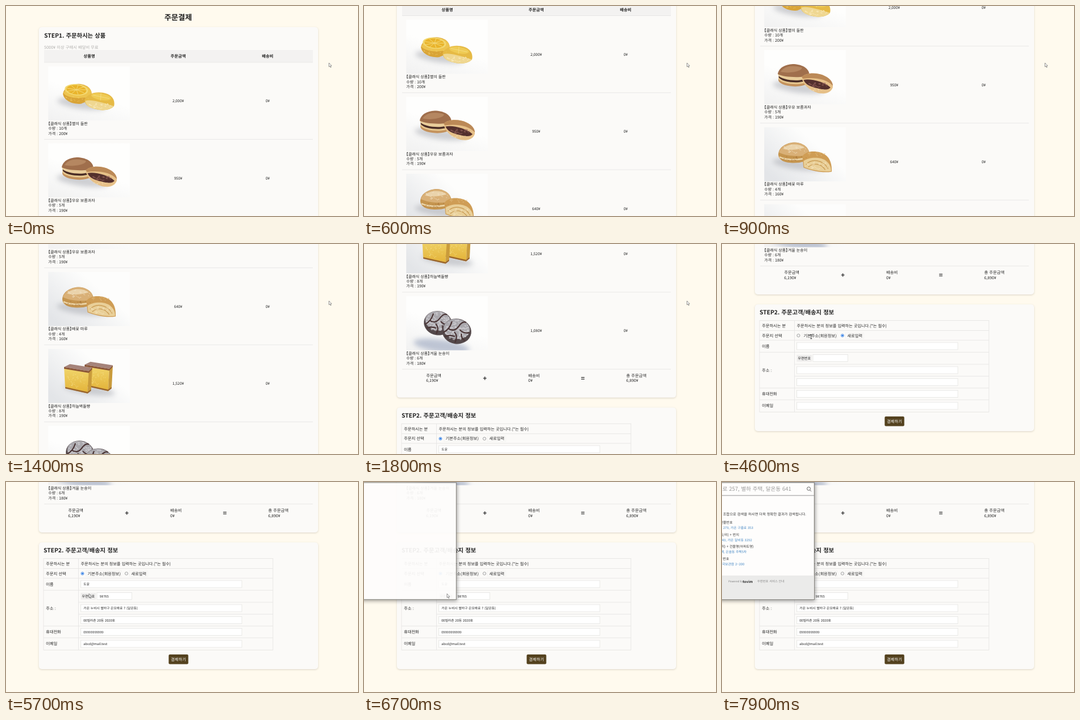
Animation, 600 px wide and 358 px high, one loop 8 s. Source, as an HTML page:

```html
<!DOCTYPE html>
<html>
<head>
<meta charset="utf-8">
<title>주문결제</title>
<style>
  html, body { margin: 0; width: 100%; height: 100%; overflow: hidden; background: #fffaee; }
  svg { display: block; width: 100%; height: 100%; }
  text {
    font-family: 'Noto Sans CJK KR', 'Noto Sans', sans-serif; fill: #222; white-space: pre;
    text-rendering: geometricPrecision; font-feature-settings: 'halt'; word-spacing: .08em;
  }
  .card { fill: #fbfaf8; filter: drop-shadow(0 1px 1.5px rgba(90, 80, 60, .22)); }
  .line { stroke: #e5e4e2; stroke-width: .8; fill: none; }
  .input { fill: #fff; stroke: #e2e1df; stroke-width: .7; }
</style>
</head>
<body>
<svg id="stage" viewBox="0 0 600 358" preserveAspectRatio="none"></svg>
<script>
const LOOP = 8000, STEP = 100, ROW = 131.3, FORM_Y = 715;

// ---- small builders ----
const text = (x, y, s, size = 7, attrs = '') => `<text x="${x}" y="${y}" font-size="${size}" ${attrs}>${s}</text>`;
const mid = (x, y, s, size, attrs = '') => text(x, y, s, size, `text-anchor="middle" ${attrs}`);
const rect = (x, y, w, h, attrs) => `<rect x="${x}" y="${y}" width="${w}" height="${h}" ${attrs}/>`;
const path = (d, fill, attrs = '') => `<path d="${d}" fill="${fill}" ${attrs}/>`;
const stroke = (d, color, width) => path(d, 'none', `stroke="${color}" stroke-width="${width}"`);
const oval = (x, y, rx, ry, fill, turn = 0, attrs = '') =>
  `<ellipse cx="${x}" cy="${y}" rx="${rx}" ry="${ry}" fill="${fill}" transform="rotate(${turn} ${x} ${y})" ${attrs}/>`;
const hline = (x1, x2, y) => `<path class="line" d="M${x1} ${y}H${x2}"/>`;

function specks(cx, cy, rx, ry, count, color, size, seed = 7) {
  let out = '';
  const rnd = () => (seed = seed * 16807 % 2147483647) / 2147483647;
  for (let i = 0; i < count; i++) {
    const a = rnd() * 6.283, r = Math.sqrt(rnd());
    out += oval((cx + Math.cos(a) * r * rx).toFixed(1), (cy + Math.sin(a) * r * ry).toFixed(1), size * (.5 + rnd()), size * .6, color);
  }
  return `<g opacity=".65">${out}</g>`;
}

// ---- pastries, drawn in a 139 x 92.5 box ----
const shadow = (x, y, rx, ry, color = '#a9abb2') => oval(x, y, rx, ry, color, 8, 'filter="url(#soft)" opacity=".55"');

function citrus() {
  let spokes = '';
  for (let i = 0; i < 9; i++) {
    const a = i * .698;
    spokes += `M48 40L${48 + 17 * Math.cos(a)} ${40 + 8 * Math.sin(a)}`;
  }
  return shadow(57, 64, 42, 9)
    + path('M25 47C27 36 38 30 52 30C66 31 75 38 74 49C72 58 63 61 56 64C42 65 27 59 25 47Z', '#d9a437')
    + path('M26 46C30 33 45 28 60 32C73 36 76 45 72 50C62 56 34 56 26 46Z', '#edc44f')
    + oval(48, 40, 20, 9.5, '#f3d871', 6) + oval(48, 40, 17, 8, '#e9b42b', 6)
    + stroke(spokes, '#f5dc80', .9)
    + path('M62 57C67 47 79 43 93 45C107 47 115 56 112 68C106 75 92 76 81 73C72 71 62 67 62 57Z', '#e6ba45')
    + path('M63 59C72 56 86 60 112 68C105 75 90 76 81 73C72 71 64 68 63 59Z', '#efd791')
    + oval(90, 52, 17, 5.5, '#efcb55', 10) + stroke('M76 49L104 55M90 46L89 58', '#f5dc80', 1)
    + specks(87, 67, 20, 5, 34, '#fff3cf', 1) + specks(48, 55, 21, 5, 22, '#f0cd6c', 1);
}

function pancake() {
  return shadow(58, 64, 44, 9)
    + oval(50, 52, 26, 10, '#c4925c', 3) + oval(50, 49, 26, 9, '#e6c78f', 3)
    + oval(50, 46.5, 25.5, 8.5, '#4a2d26', 3) + oval(50, 43, 26.5, 8.5, '#e9cd9a', 3)
    + path('M23 41C25 29 38 24 51 24C66 25 77 32 77 43C66 48 34 47 23 41Z', '#a06f4c')
    + path('M28 37C34 27 50 25 64 30C66 36 40 41 28 37Z', '#b58761')
    + path('M64 46C69 40 82 38 94 41C107 44 117 52 117 63C115 71 107 75 97 74C83 73 65 61 64 46Z', '#e6c088')
    + path('M64 46C69 40 82 38 94 41C107 44 117 52 117 61C107 49 84 46 66 49Z', '#bb8957')
    + path('M67 51C78 48 103 54 113 64C109 69 100 68 90 65C80 63 70 59 67 51Z', '#54302d')
    + specks(91, 59, 17, 4.5, 36, '#99665f', 1.3) + specks(90, 68, 14, 2, 18, '#f5e0b7', 1);
}

function pastry() {
  return shadow(58, 64, 44, 9)
    + path('M24 46C25 33 39 26 53 26C67 27 78 36 77 48C75 58 64 61 50 61C36 61 24 57 24 46Z', '#c5954f')
    + path('M25 43C29 30 45 25 58 27C72 30 78 39 75 47C64 51 37 50 25 43Z', '#d9b077')
    + path('M32 37C39 28 58 27 69 35C60 38 44 40 32 37Z', '#ead3ab')
    + stroke('M26 51C38 57 62 57 75 51', '#ecd7ab', 2.5)
    + path('M65 50C70 41 84 40 95 43C107 46 116 56 115 76C100 79 80 74 67 69Z', '#cf9d55')
    + path('M67 58C76 51 96 50 106 58C112 63 114 69 114 75C100 77 80 73 68 68Z', '#e9cf98')
    + stroke('M71 64C80 54 99 54 109 71M75 68C84 61 96 61 104 73', '#cca05a', 1.4)
    + specks(90, 65, 20, 7, 34, '#f6e6c2', 1.2) + specks(51, 37, 20, 8, 30, '#f3e3c8', 1.1)
    + specks(50, 53, 23, 5, 22, '#a8733a', 1.1, 31) + specks(88, 46, 16, 3, 18, '#e9c78e', 1, 13);
}

function sponge() {
  const block = (x, y) => `<g transform="translate(${x} ${y})">`
    + path('M0 6L42 13L40 50L2 41Z', 'url(#crumb)') + path('M42 13L48 7L46 45L40 50Z', '#c99b3b')
    + path('M0 5L10 0L48 6L42 12Z', '#a5837a') + path('M0 5L42 12L48 6V8.5L42 15L0 8Z', '#8a5538')
    + path('M2 39L40 47.5L46 43V45.5L40 50L2 41.5Z', '#99652f')
    + specks(20, 27, 16, 13, 40, '#f7e28e', .9) + '</g>';
  return shadow(70, 70, 44, 8) + block(62, 22) + block(27, 26);
}

function crinkle() {
  const ball = (x, y, r, seed) => `<g transform="translate(${x} ${y}) scale(${r / 25})">`
    + oval(0, 0, 25, 21.5, '#54494b', 8) + oval(0, -4, 22.5, 17, '#aaa8ad', 8)
    + specks(0, -2, 21, 17, 110, '#dddce0', 1.6, seed)
    + stroke('M-23 2Q-12-3-8-17M-15-5Q-4 2 3-8T16-15M-4 1Q3 9-3 19M5-3Q12 5 22 2M-20 9Q-12 5-3 9M8 4Q7 12 14 16', '#4a3536', 2.2)
    + '</g>';
  return shadow(60, 85, 48, 11, '#8f9cb8') + ball(54, 46, 24, 11) + ball(86, 60, 25, 29);
}

// ---- page ----
const products = [
  { name: '별의 들판', count: 10, price: 200, draw: citrus },
  { name: '우유 보름과자', count: 5, price: 190, draw: pancake },
  { name: '배꽃 마루', count: 4, price: 160, draw: pastry },
  { name: '하늘벽돌빵', count: 8, price: 190, draw: sponge },
  { name: '겨울 눈송이', count: 6, price: 180, draw: crinkle }
];

function productRow({ name, count, price, draw }, i) {
  const y = 96 + ROW * i;
  return `<svg x="72" y="${y + 6.8}" width="139" height="92.5">${rect(0, 0, 139, 92.5, `fill="url(#${i % 4 < 2 ? 'bright' : 'cool'})"`)}<g filter="url(#photo)">${draw()}</g></svg>`
    + text(72, y + 106.8, `【클래식 상품】${name}`, 6.8)
    + text(72, y + 115, `수량 : ${count}개`, 6.7) + text(72, y + 123.5, `가격 : ${price}¥`, 6.7)
    + mid(293.5, y + 68.4, (count * price).toLocaleString('en-US') + '¥', 6.4) + mid(446, y + 68.4, '0¥', 6.4)
    + hline(65, 523, y + ROW);
}

const orderCard = rect(56, 36, 476, 765, 'rx="5" class="card"')
  + mid(293.5, 23.5, '주문결제', 12.8, 'font-weight="700"')
  + text(65, 54.3, 'STEP1. 주문하시는 상품', 10, 'font-weight="700"')
  + text(65, 73.2, '5000¥ 이상 구매시 배달비 무료', 7, 'style="fill:#b0afad"')
  + rect(65, 75, 458, 21, 'fill="#f3f2f1"') + hline(65, 523, 96)
  + [['상품명', 142], ['주문금액', 293.5], ['배송비', 446]].map(([s, x]) => mid(x, 88, s, 7, 'font-weight="700"')).join('')
  + products.map(productRow).join('');

const totals = [['주문금액', '6,190¥', 106], ['배송비', '0¥', 280], ['총 주문금액', '6,890¥', 447]]
  .map(([label, sum, x]) => text(x, 51, label) + text(x, 59.5, sum, 6.7)).join('')
  + mid(206, 57.3, '+', 11, 'font-weight="700"') + mid(373, 57.3, '=', 11, 'font-weight="700"');

const labels = [['주문하시는 분', 142], ['주문지 선택', 158.6], ['이름', 177], ['주소 :', 217.6], ['휴대전화', 258.2], ['이메일', 278.4]];
const fields = [
  [127.5, 168, 274.5, '도윤'],
  [155, 188.5, 59.5, '98765'],
  [127.5, 209, 274.5, '가온 누비시 별하구 은모래로 7 (달온동)'],
  [127.5, 229.4, 274.5, '00빌라촌 20동 2020호'],
  [127.5, 249.6, 274.5, '09999999999'],
  [127.5, 270, 274.5, 'abcd@mail.test']
];
const radio = (x, id) => `<circle id="${id}" cx="${x}" cy="156" r="2.5"/><circle id="${id}Dot" cx="${x}" cy="156" r="1.5" fill="#2374e1"/>`;

const form = rect(56, 103, 476, 216, 'rx="5" class="card"')
  + text(64, 120.3, 'STEP2. 주문고객/배송지 정보', 10, 'font-weight="700"')
  + rect(64, 130.5, 391, 156, 'class="line"') + '<path class="line" d="M123.5 130.5V286.5"/>'
  + [147.5, 164, 184.5, 245.5, 265.7].map(y => hline(64, 455, y)).join('')
  + hline(123.5, 455, 205) + hline(123.5, 455, 225.3)
  + labels.map(([s, y]) => text(68, y, s)).join('')
  + text(127.5, 142, '주문하시는 분의 정보를 입력하는 곳입니다.(*는 필수)', 6.9)
  + rect(136.5, 151, 60, 10, 'fill="none" stroke="#f0efed" stroke-width=".6"')
  + rect(210.5, 151, 31, 10, 'fill="none" stroke="#f0efed" stroke-width=".6"')
  + radio(130.3, 'saved') + radio(205.3, 'fresh')
  + text(139, 158.6, '기본주소(회원정보)') + text(213.5, 158.6, '새로입력')
  + fields.map(([x, y, w]) => rect(x, y, w, 12, 'class="input"')).join('')
  + rect(127.5, 189, 25.5, 11.5, 'fill="#efeeed"') + mid(140.2, 197, '우편번호', 6)
  + `<g id="values">${fields.map(([x, y, , s]) => text(x + 4.5, y + 8.1, s, 5.6)).join('')}</g>`
  + rect(277.3, 294, 33.4, 16.6, 'rx="2" fill="#54421f"') + mid(294, 305, '결제하기', 7, 'style="fill:#fff"');

// ---- postcode window; lines run in from beyond the left edge ----
const popupLine = (x, y, s, size, color) => text(x, y, s, size, `text-anchor="end" style="fill:${color}"`);
const hints = [
  [18, 71.2, '도로명 + 건물번호', 53, 79.8, '은빛로 279, 가온 구름로 353'],
  [29, 92.3, '지역명(동/리) + 번지', 51, 101, '달온동 43, 가온 달비동 3292'],
  [54, 112.3, '지역명(동/리) + 건물명(아파트명)', 42, 121, '별하 주택, 은솔동 주택5차'],
  [12, 133.2, '사서함명 + 번호', 38, 142, '누비우체국보관함 2~200']
];
const popup = rect(-10, 1, 167.3, 199.3, 'fill="#fefdfc" stroke="#77756f" stroke-width="1" style="filter:drop-shadow(1px 2px 3px rgba(0,0,0,.4))"')
  + '<g id="search">'
  + popupLine(118, 15.2, '은빛로 257, 별하 주택, 달온동 641', 9.2, '#9a9a9a')
  + stroke('M0 23H157', '#8b8b8b', .9)
  + stroke('M150 13.8L152.3 16', '#555', .9) + '<circle cx="147.8" cy="11.4" r="2.9" fill="none" stroke="#555" stroke-width=".9"/>'
  + popupLine(143.5, 56.7, '아래와 같은 조합으로 검색을 하시면 더욱 정확한 결과가 검색됩니다.', 6.1, '#333')
  + hints.map(([x, y, s, x2, y2, link]) => popupLine(x, y, s, 5.8, '#333') + popupLine(x2, y2, link, 5.6, '#4487c4')).join('')
  + rect(0, 160, 156.8, 39.8, 'fill="#ebebea"') + hline(0, 157, 160)
  + text(11, 171.2, 'Powered by', 4.5, 'style="fill:#777"') + text(35.5, 171.5, 'tovim', 5.9, 'font-weight="700"')
  + text(60, 171.4, '우편번호 서비스 안내', 5.2, 'style="fill:#888"')
  + '</g>';

document.getElementById('stage').innerHTML = `
  <defs>
    <filter id="soft" x="-50%" y="-100%" width="200%" height="300%"><feGaussianBlur stdDeviation="4"/></filter>
    <filter id="photo"><feGaussianBlur stdDeviation=".5"/></filter>
    <linearGradient id="bright" x1="0" y1="1" x2=".5" y2="0"><stop stop-color="#f1f1f1"/><stop offset=".6" stop-color="#fefefd"/></linearGradient>
    <linearGradient id="cool" x1="0" y1=".8" x2=".8" y2=".2"><stop stop-color="#e3e5e8"/><stop offset=".8" stop-color="#fdfdfc"/></linearGradient>
    <linearGradient id="crumb" x1="0" y1="0" x2="0" y2="1"><stop stop-color="#f1d66c"/><stop offset="1" stop-color="#e3b238"/></linearGradient>
  </defs>
  <rect width="600" height="358" fill="#fffaee"/>
  <g id="page">${orderCard}<g transform="translate(0 ${FORM_Y})">${totals}${form}</g></g>
  <g id="popup">${popup}</g>
  <g id="cursor" stroke-linejoin="round">
    <path id="arrow" d="M0 0V6.6L1.5 5.3L2.6 7.8L3.7 7.3L2.6 4.9H4.6Z" fill="#fff" stroke="#555" stroke-width=".6"/>
    <path id="beam" d="M-1.4-3.5H1.4M0-3.5V3.5M-1.4 3.5H1.4" fill="none" stroke="#222" stroke-width=".8"/>
  </g>`;

// ---- motion ----
const scrollKeys = [[300, 0], [900, 159], [1400, 318], [2100, 705], [2200, FORM_Y]];
const cursorXKeys = [[2600, 550.5], [3000, 225], [3800, 205], [4200, 205], [4600, 152], [4900, 130], [5200, 130], [5700, 141.5]];
const cursorYKeys = [[2600, 97], [3000, 172], [3800, 156], [4200, 156], [4600, 158], [4900, 156], [5200, 156], [5700, 190.5]];
const popupKeys = [[6500, 0], [6600, .6], [6700, .93], [6800, 1]];

function along(keys, t) {
  if (t <= keys[0][0]) return keys[0][1];
  for (let i = 1; i < keys.length; i++) {
    const [t0, v0] = keys[i - 1], [t1, v1] = keys[i];
    if (t < t1) return v0 + (v1 - v0) * (t - t0) / (t1 - t0);
  }
  return keys[keys.length - 1][1];
}

const el = id => document.getElementById(id);
const show = (id, on) => el(id).setAttribute('visibility', on ? 'inherit' : 'hidden');

function setRadio(id, on) {
  el(id).setAttribute('fill', '#fff');
  el(id).setAttribute('stroke', on ? '#2374e1' : '#777');
  el(id).setAttribute('stroke-width', '.7');
  show(id + 'Dot', on);
}

function render(t) {
  el('page').setAttribute('transform', `translate(0 ${-along(scrollKeys, t)})`);
  const saved = t < 4100 || t >= 5100;
  setRadio('saved', saved);
  setRadio('fresh', !saved);
  show('values', saved);

  el('popup').setAttribute('opacity', along(popupKeys, t));
  show('search', t >= 7200);

  const x = along(cursorXKeys, t), y = along(cursorYKeys, t);
  const overLabel = t > 3000 && x > 137 && x < 197 && y < 162;
  el('cursor').setAttribute('transform', `translate(${x} ${y})`);
  show('cursor', t < 7000);
  show('arrow', !overLabel);
  show('beam', overLabel);
}

const start = performance.now();
function tick() {
  render(Math.floor((performance.now() - start) % LOOP / STEP) * STEP);
  requestAnimationFrame(tick);
}
tick();
</script>
</body>
</html>
```
